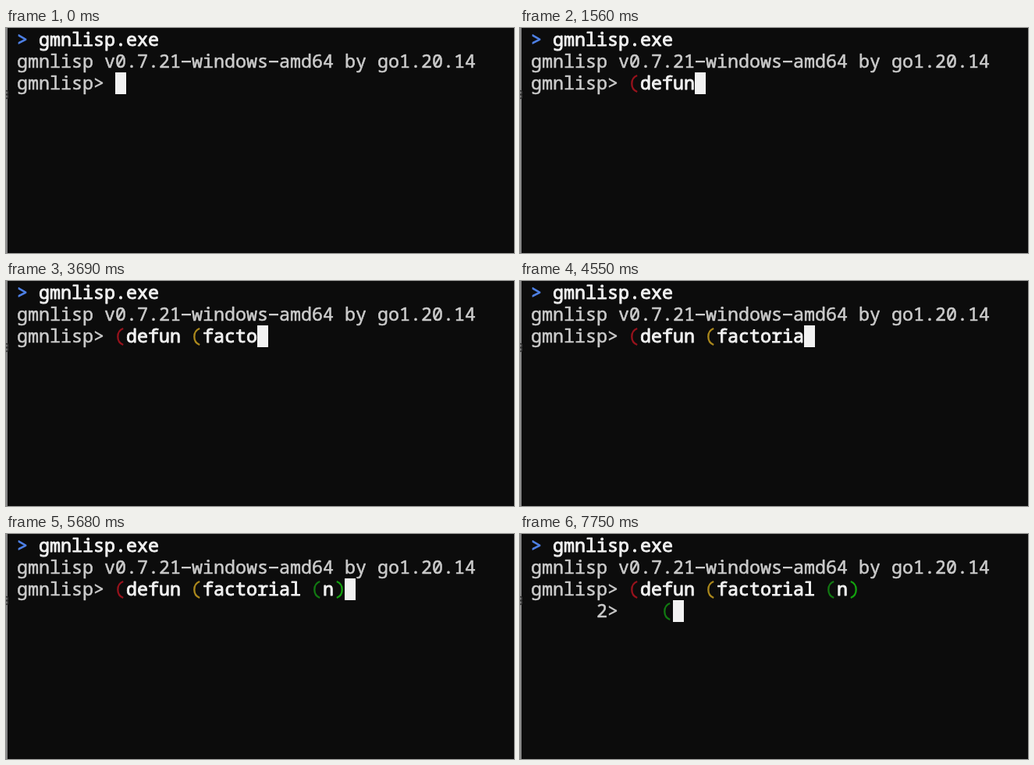
An HTML page with a canvas for the animation above (8 s loop, 651 by 289 pixels).

```html
<!DOCTYPE html>
<html lang="en">
<head>
<meta charset="utf-8">
<title>Terminal session</title>
<style>
  html, body { margin: 0; width: 100%; height: 100%; overflow: hidden; background: #0c0c0c; }
  canvas { display: block; }
</style>
</head>
<body>
<canvas id="stage" width="651" height="289"></canvas>
<script>
const ctx = document.getElementById("stage").getContext("2d");
const LOOP = 8000;
const CELL = { w: 14, h: 28, left: 14, top: 1, baseline: 22 };
const GREY = "#cccccc", WHITE = "#f2f2f2", BLUE = "#4f82e8";
const PAREN = { red: "#96121c", yellow: "#ab881c", green: "#127812", bright: "#13a10e" };
const MEDIUM = 0.55, HEAVY = 0.95;

const FIRST_LINE = "(defun (factorial (n)";
const SECOND_LINE = "   (";

// One time per key; the key after the first line is Enter.
const KEY_TIMES = [
  420, 620, 890, 1350, 1490, 1560, 1890, 2090,
  3030, 3170, 3300, 3560, 3690, 4020, 4090, 4550, 4680, 4880, 5210, 5410, 5680,
  6280, 6690, 6890, 7090, 7750
];
const CURSOR_OFF = [[620, 690], [1350, 1420], [2760, 3100], [6890, 6990]];

const cellX = col => CELL.left + col * CELL.w;
const cellY = row => CELL.top + row * CELL.h;

// The outline thickens the regular weight of the font.
function put(text, col, row, color, outline = MEDIUM) {
  ctx.font = '23.33px "Noto Sans Mono", monospace';
  ctx.lineJoin = "round";
  ctx.lineWidth = outline;
  ctx.fillStyle = ctx.strokeStyle = color;
  [...text].forEach((ch, i) => {
    const x = cellX(col + i), y = cellY(row);
    if (ch === "-") {
      ctx.fillRect(x + 1, y + 13, CELL.w - 2, 2.3);
    } else {
      ctx.fillText(ch, x, y + CELL.baseline);
      ctx.strokeText(ch, x, y + CELL.baseline);
    }
  });
}

function putParen(ch, col, row, color) {
  ctx.save();
  ctx.translate(cellX(col) + CELL.w / 2, cellY(row));
  if (ch === ")") ctx.scale(-1, 1);
  ctx.strokeStyle = color;
  ctx.lineWidth = 2.3;
  ctx.beginPath();
  ctx.moveTo(3.2, 4);
  ctx.bezierCurveTo(-6, 7.5, -6, 21.5, 3.2, 25);
  ctx.stroke();
  ctx.restore();
}

function putCode(text, col, row, openColors) {
  let opened = 0;
  [...text].forEach((ch, i) => {
    if (ch === "(") putParen(ch, col + i, row, openColors[opened++]);
    else if (ch === ")") putParen(ch, col + i, row, PAREN.bright);
    else put(ch, col + i, row, WHITE, HEAVY);
  });
}

function drawEdge() {
  ctx.fillStyle = "#858585";
  ctx.fillRect(0, 0, 2, 289);
  ctx.strokeStyle = "#343434";
  ctx.lineWidth = 1.5;
  ctx.beginPath();
  ctx.arc(0, 83, 2.5, -Math.PI / 2, Math.PI / 2);
  ctx.arc(0, 88, 2.5, -Math.PI / 2, Math.PI / 2);
  ctx.stroke();
}

function draw(time) {
  ctx.fillStyle = "#0c0c0c";
  ctx.fillRect(0, 0, 651, 289);
  drawEdge();

  put(">", 0, 0, BLUE, HEAVY);
  put("gmnlisp.exe", 2, 0, WHITE, HEAVY);
  put("gmnlisp v0.7.21-windows-amd64 by go1.20.14", 0, 1, GREY);
  put("gmnlisp>", 0, 2, GREY);

  const keys = KEY_TIMES.filter(t => t <= time).length;
  const entered = keys > FIRST_LINE.length;
  const typed = entered ? keys - FIRST_LINE.length - 1 : keys;

  putCode(FIRST_LINE.slice(0, keys), 9, 2, [PAREN.red, PAREN.yellow, PAREN.green]);
  if (entered) {
    put("2>", 6, 3, GREY);
    putCode(SECOND_LINE.slice(0, typed), 9, 3, [PAREN.green]);
  }

  if (!CURSOR_OFF.some(([from, to]) => time >= from && time < to)) {
    ctx.fillStyle = WHITE;
    ctx.fillRect(cellX(9 + typed), cellY(entered ? 3 : 2), CELL.w, CELL.h);
  }
}

const start = performance.now();
function tick() {
  draw((performance.now() - start) % LOOP);
  requestAnimationFrame(tick);
}
tick();
</script>
</body>
</html>
```
